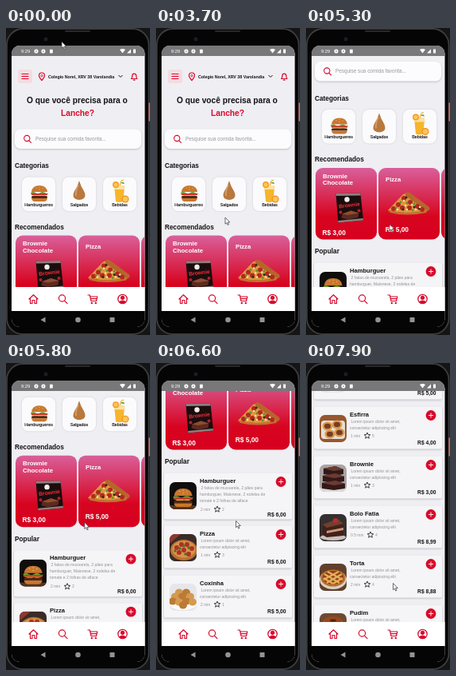
Recreate the animation shown at these times as an HTML page. Size 181x384 px, loop 8000 ms.

```html
<!DOCTYPE html>
<html lang="pt-BR">
<head>
<meta charset="utf-8">
<title>Lanches</title>
<style>
html, body { margin: 0; width: 100%; height: 100%; overflow: hidden; background: #111; }
svg { display: block; width: 100vw; height: 100vh; font-family: "Liberation Sans", Arial, sans-serif; }
.b { font-weight: 700; }
.m { stroke: currentColor; stroke-width: .12; }
.line { fill: none; stroke: #d80a2c; stroke-width: 1.2; stroke-linecap: round; stroke-linejoin: round; }
.card { filter: drop-shadow(0 1px 1.2px #0003); }
.soft { filter: drop-shadow(0 .5px 1.2px #0002); }
</style>
</head>
<body>
<svg id="stage" viewBox="0 0 181 384"></svg>
<script>
const RED = '#d80a2c', INK = '#131216', GREY = '#939197', NAV = '#939396';

const rect = (x, y, w, h, fill, r = 0, extra = '') =>
  `<rect x="${x}" y="${y}" width="${w}" height="${h}" rx="${r}" fill="${fill}" ${extra}/>`;
const oval = (x, y, rx, ry, fill, extra = '') =>
  `<ellipse cx="${x}" cy="${y}" rx="${rx}" ry="${ry}" fill="${fill}" ${extra}/>`;
const dot = (x, y, r, fill, extra) => oval(x, y, r, r, fill, extra);
const path = (d, fill, extra = '') => `<path d="${d}" fill="${fill}" ${extra}/>`;
const line = d => `<path class="line" d="${d}"/>`;
const text = (x, y, size, str, fill = INK, extra = '') =>
  `<text x="${x}" y="${y}" font-size="${size}" fill="${fill}" ${extra}>${str}</text>`;
const bold = (x, y, size, str, fill, extra = '') => text(x, y, size, str, fill, `class="b" ${extra}`);
const move = (x, y, body, s = 1) => `<g transform="translate(${x} ${y}) scale(${s})">${body}</g>`;
const dots = (list, r, fill) => list.map(([x, y]) => dot(x, y, r, fill)).join('');
const MID = 'text-anchor="middle"';

// Food drawings
const burger =
  path('M1 8Q2 0 11 0T21 8Z', '#c9772e') + dots([[7, 3], [11, 2], [15, 3.5], [11, 5]], .5, '#f3d9a0') +
  path('M0 9Q3 7 6 9T12 9T18 9T22 9L21 12H1Z', '#6f9a32') +
  rect(1, 10, 20, 2, '#c93423', 1) + path('M2 12H20L15 14L12 12.5L7 14.5Z', '#f2b530') +
  rect(1, 13, 20, 3, '#4f281a', 1.5) + path('M1 16H21Q20 20 17 20H5Q2 20 1 16Z', '#c9772e');

const drop = color => path('M0 -12Q2 -5 6 1Q9 7 6 10Q0 14 -6 10Q-9 7 -6 1Q-2 -5 0 -12Z', color) +
  path('M-1 -7Q-5 1 -4 7', 'none', 'stroke="#fff4" stroke-width="2"');

const juice =
  path('M8 9L11 0L14 -1', 'none', 'stroke="#e7a21c" stroke-width="1"') +
  path('M2 6H15L13.500 26Q8 28 4 26Z', '#f6b52c') + path('M2 6H15L14.600 11H2.400Z', '#fbe2a0') +
  dot(4, 5, 4, '#f39a1b') + dot(4, 5, 2.6, '#fbc75b') +
  dot(16, 23, 4.5, '#f08f1a') + dot(16, 23, 3.3, '#fac65a') + path('M10 3Q14 0 15 4Z', '#5d9b3d');

const slice =
  path('M1 24L20 4L26 2L53 23Q35 31 1 24Z', '#dd983f') +
  path('M23 2Q27 0 30 3L53 20Q55 24 50 25L23 6Z', '#b5662b') +
  path('M1 24Q24 30 51 23L49 27Q24 32 4 27Z', '#c17430') +
  dots([[21, 9], [29, 14], [38, 19], [28, 21], [14, 17], [19, 21], [8, 22], [44, 23]], 3, '#b3281f') +
  dots([[24, 8], [34, 20], [20, 23], [40, 22]], 1.5, '#2c2a1b') +
  dots([[25, 15], [34, 16], [17, 14], [32, 24], [11, 21]], 1.4, '#5f8f36') +
  dots([[23, 18], [31, 17], [41, 20], [13, 23], [21, 12], [25, 23], [36, 23]], 1.2, '#f9e3a4');

const packet =
  path('M1 1.500L32 1L35.500 35L4 38Z', '#1b0d0e') + path('M1 1.500L32 1L32.300 4L1.300 4.500Z', '#8c7f7f') +
  path('M3.700 35.500L35.300 32.500L35.500 35L4 38Z', '#8c7f7f') + dot(15, 9, 3.2, '#f1ece8') +
  `<g transform="rotate(-7 5 20)">${bold(5, 20, 6.8, 'Brownie', '#ef2f38')}</g>` +
  path('M9 27L20 23L30 26L29 31.500L16 34L8 32Z', '#5c2a1e') + path('M9 27L20 23L30 26L16 28.500Z', '#8f4c33') +
  dots([[7, 25], [30, 23]], 2, '#b51f2a');

const photos = {
  burger: rect(0, 0, 34, 34, '#100d0d') + rect(0, 29, 34, 5, '#55331f') + move(4.5, 8, burger, 1.15),
  pizza: rect(0, 0, 34, 34, '#3b2b28') + oval(18, 20, 17, 13, '#b8702f') + oval(18, 19, 14.5, 10.5, '#d8934a') +
    dots([[9, 17], [15, 13], [22, 13], [28, 18], [18, 20], [12, 23], [24, 25]], 3, '#ab3324') +
    dots([[13, 18], [24, 17], [20, 25], [7, 21], [18, 15]], 1.7, '#4f6f2f') + path('M0 0H14L0 12Z', '#8a3a30'),
  coxinha: rect(0, 0, 34, 34, '#e6e7ea') + oval(17, 25, 17, 8, '#fbfaf8') +
    [[12, 11], [21, 11], [7, 16], [16, 16], [26, 16], [4, 22], [12, 23], [21, 22], [29, 23], [17, 27]]
      .map(([x, y], i) => oval(x, y, 5, 4.6, i % 2 ? '#bd7a35' : '#d39a50')).join(''),
  esfirra: rect(0, 0, 34, 34, '#96572f') + rect(2, 7, 30, 23, '#e8dfd5', 4) +
    [[10, 14], [22, 12], [13, 24], [25, 22]].map(([x, y]) =>
      oval(x, y, 6.5, 5.5, '#d99b4c') + oval(x, y, 4, 3.2, '#7a3c22')).join(''),
  brownie: rect(0, 0, 34, 34, '#a9a4a3') + oval(17, 31, 17, 4, '#dcd8d5') +
    [5, 14, 23].map((y, i) => path(`M${5 - i} ${y}L20 ${y - 3}L${30 + i} ${y + 1}V${y + 7}L18 ${y + 9}L${5 - i} ${y + 7}Z`, '#32191a') +
      path(`M${5 - i} ${y}L20 ${y - 3}L${30 + i} ${y + 1}L18 ${y + 3}Z`, '#6b3c31')).join(''),
  cake: rect(0, 0, 34, 34, '#35302f') + oval(17, 29, 16, 4, '#c9c2bd') +
    path('M4 13L23 6L30 12V27L9 29L4 26Z', '#43201b') + path('M4 13L23 6L30 12L9 17Z', '#70402f') +
    path('M9 21L30 17V20L9 24Z', '#c69a79') + dot(20, 8, 3, '#b92b30'),
  pie: rect(0, 0, 34, 34, '#60402d') + oval(17, 20, 17, 12, '#d9d0c4') + oval(17, 18, 15.5, 10.5, '#b96d28') +
    oval(17, 17.5, 13, 8.5, '#8c4219') +
    path('M6 13L25 24M10 10L29 20M5 18L17 25M28 13L9 24M24 10L5 20M29 18L17 25', 'none', 'stroke="#e6af5a" stroke-width="2.2"'),
  flan: rect(0, 0, 34, 34, '#6d4932') + oval(17, 26, 16, 6, '#eee7dd') +
    path('M6 8H28L31 25Q17 31 3 25Z', '#dd9a42') + oval(17, 9, 11.5, 5, '#9a481a') + oval(17, 9, 4, 1.7, '#56270f')
};

const star = (x, y) => {
  const pts = Array.from({ length: 10 }, (_, i) => {
    const r = i % 2 ? 1.8 : 4, a = i * Math.PI / 5;
    return `${(x + r * Math.sin(a)).toFixed(2)} ${(y - r * Math.cos(a)).toFixed(2)}`;
  });
  return path(`M${pts.join('L')}Z`, 'none', `stroke="${INK}" stroke-width=".8" stroke-linejoin="round"`);
};

const lorem = ['&#160;Lorem ipsum dolor sit amet,', 'consectetur adipiscing elit'];
const items = [
  ['Hamburguer', 'burger', '2', 2, '6,00', ['&#160;2 fatias de mussarela, 2 pães para',
    'hamburguer, Maionese, 2 rodelas de', 'tomate e 2 folhas de alface']],
  ['Pizza', 'pizza', '1', 3, '6,00'],
  ['Coxinha', 'coxinha', '2', 1, '5,00'],
  ['Esfirra', 'esfirra', '1', 5, '4,00'],
  ['Brownie', 'brownie', '1', 3, '3,00'],
  ['Bolo Fatia', 'cake', '0.5', 4, '8,99'],
  ['Torta', 'pie', '2', 4, '8,88'],
  ['Pudim', 'flan', '1', 4, '5,00']
];

// y = 0 is the middle of the item's name
function item([name, photo, mins, stars, price, lines = lorem], i) {
  const y = i ? 391.5 + 62 * i : 387.5, tall = lines.length > 2;
  const meta = tall ? 36 : 27, shift = mins.length > 1 ? 4 : 0;
  return move(0, y,
    rect(10, -9.5, 161, tall ? 58 : 53, '#f5f4f6', 2, 'class="card"') +
    move(17, tall ? 2 : 1, `<g clip-path="url(#photo)">${photos[photo]}</g>`) +
    bold(55, 2.7, 7.6, name) +
    lines.map((s, n) => text(55, 10.8 + 8 * n, 5.05, s, GREY)).join('') +
    text(56, meta + 1.8, 5, mins + ' min', GREY) + star(77 + shift, meta) +
    text(83 + shift, meta + 1.5, 5, stars, GREY) +
    dot(157, 1.5, 6.4, RED) + path('M154 1.500H160M157 -1.500V4.500', 'none', 'stroke="#fff" stroke-width=".9"') +
    bold(163.5, tall ? 44.7 : 38, 6.7, 'R$ ' + price, INK, 'text-anchor="end"'));
}

const category = (x, label, art) =>
  rect(x - 21, 186.5, 42, 42.5, '#fbfafc', 8, 'class="soft"') + art +
  text(x, 222.5, 5.4, label, INK, `class="m" ${MID}`);

const promo = x => rect(x, 259.5, 77, 89.5, 'url(#promo)', 9);

const page =
  rect(15, 52, 18, 17, '#f5dbe1', 3) + line('M20 57.500H28M20 60.500H28M20 63.500H28') +
  line('M45 65.500Q41.500 61.500 41.500 59.500A3.500 3.500 0 0 1 48.500 59.500Q48.500 61.500 45 65.500Z') +
  dot(45, 59.7, 1.2, 'none', `stroke="${RED}" stroke-width=".8"`) +
  bold(53, 62.5, 5.28, 'Colegio Norel, XRV 38 Varolandia') +
  path('M141.500 59L144 61.500L146.500 59', 'none', `stroke="${INK}" stroke-width="1"`) +
  line('M157.500 63.500Q158.700 62.500 158.700 60A2.500 2.800 0 0 1 163.700 60Q163.700 62.500 164.800 63.500ZM160.300 65.200H162') +
  bold(26, 93.5, 10.2, 'O que você precisa para o') + bold(90, 110, 10.2, 'Lanche?', RED, MID) +
  rect(11, 126.5, 159, 24.5, '#fcfbfd', 7, 'class="card"') +
  dot(26.3, 138, 3.6, 'none', `stroke="${RED}" stroke-width="1.1"`) + line('M29 140.800L31.500 143.300') +
  text(37, 140.7, 6.4, 'Pesquise sua comida favorita...', '#9a98a0') +
  bold(11, 175, 8.3, 'Categorias') +
  category(41, 'Hamburgueres', move(31, 197, burger)) +
  category(92, 'Salgados', move(92, 203, drop('#b9783c'))) +
  category(143, 'Bebidas', move(134, 191, juice)) +
  bold(11, 251.8, 8.3, 'Recomendados') +
  promo(12) + promo(91) + promo(170) +
  bold(21, 272, 7.9, 'Brownie', '#fff') + bold(21, 280.5, 7.9, 'Chocolate', '#fff') +
  bold(100, 276.4, 7.7, 'Pizza', '#fff') +
  move(36.5, 290, packet) + move(102, 288.5, slice) +
  bold(20.5, 343.2, 8.4, 'R$ 3,00', '#fff') + bold(99.7, 339, 8.4, 'R$ 5,00', '#fff') +
  bold(11, 366.5, 8.3, 'Popular') +
  items.map(item).join('');

const statusBar =
  rect(7, 22, 168, 13, '#78777a') + text(19, 31, 5.8, '9:29', '#fff') +
  dot(38, 29, 1.7, 'none', 'stroke="#fff" stroke-width="1.7"') +
  dot(47, 29, 1.7, 'none', 'stroke="#fff" stroke-width="1.7"') + rect(55, 26.8, 3.8, 4.7, '#fff', .6) +
  path('M143 27Q146.500 24.800 150 27L146.500 31.500Z', '#fff') + path('M152 31.500H157V26.500Z', '#fff') +
  rect(160, 26.5, 3, 5, '#fff', .5);

const tabBar =
  rect(7, 324, 168, 30, '#fff') +
  line('M29 339L34.500 333.800L40 339M30.500 338V344.500H33V340.500H36V344.500H38.500V338') +
  dot(70.5, 338, 4.1, 'none', `stroke="${RED}" stroke-width="1.2"`) + line('M73.500 341.200L77 344.700') +
  line('M103 334H105.300L107 341.500H113.500L114.800 336H105.800M106.500 338.700H114') +
  dot(107.8, 344, 1.2, RED) + dot(112.8, 344, 1.2, RED) +
  dot(146.5, 339, 5.7, 'none', `stroke="${RED}" stroke-width="1.3"`) + dot(146.5, 337.3, 2.6, RED) +
  path('M142 342.500Q146.500 338.300 151 342.500Q146.500 347 142 342.500Z', RED);

const navBar =
  rect(7, 354, 168, 20, '#050506') + path('M49.500 361.500V368.500L43.500 365Z', NAV) +
  dot(90.5, 365, 3.3, NAV) + rect(130.5, 362, 6, 6, NAV, .6);

document.getElementById('stage').innerHTML = `
  <defs>
    <linearGradient id="promo" x2="0" y2="1">
      <stop stop-color="#d9609b"/><stop offset=".68" stop-color="#d7041f"/><stop offset="1" stop-color="#d7001f"/>
    </linearGradient>
    <clipPath id="photo"><rect width="34" height="34" rx="7"/></clipPath>
    <clipPath id="screen"><rect x="7" y="22" width="167.500" height="352" rx="10"/></clipPath>
    <clipPath id="view"><rect x="7" y="35" width="167.500" height="289"/></clipPath>
  </defs>
  ${rect(0, 0, 181, 384, '#151516')}
  ${rect(1, 1, 178.5, 382, '#050506', 20, 'stroke="#3d3d40" stroke-width="1.800"')}
  ${rect(179.3, 93.5, 2, 23, '#d0695a')}
  ${rect(74, 3, 32, 2, '#29292c', 1)}${dot(50, 14, 2.5, '#1b1d25')}
  <g clip-path="url(#screen)">
    ${rect(7, 22, 168, 352, '#efeef2')}
    <g clip-path="url(#view)"><g id="page">${page}</g></g>
    ${statusBar}${tabBar}${navBar}
  </g>
  <g id="cursor">${path('M0 0V8.200L1.900 6.500L3.200 9.500L4.500 8.900L3.200 6H5.800Z', '#fff', 'stroke="#333" stroke-width=".7"')}</g>`;

// Keys: time, value...
const scrollKeys = [[0, 0], [4000, 0], [5300, 84.5], [6100, 179.5], [6600, 240.5], [7900, 513.5]];
const cursorKeys = [
  [0, 70, 17], [400, 70, 17], [700, 74, 18], [1000, 74, 18], [1200, 78, 19], [1400, 78, 19], [1500, 91.5, 244.5],
  [1900, 91.5, 244.5], [2000, 107, 290], [2100, 91, 246], [2300, 91, 247], [2900, 91, 247], [3300, 87, 246],
  [3600, 87, 246], [3700, 87, 237], [3800, 78, 223], [3900, 87, 246], [5300, 105, 245.5],
  [6100, 95, 171.5], [6600, 100.5, 197.5], [7900, 109.5, 275.5]
];

function sample(keys, t) {
  const i = keys.findIndex(k => k[0] > t);
  if (i < 0) return keys[keys.length - 1].slice(1);
  const [t0, ...a] = keys[i - 1], [t1, ...b] = keys[i];
  return a.map((v, n) => v + (b[n] - v) * (t - t0) / (t1 - t0));
}

const pageEl = document.getElementById('page'), cursorEl = document.getElementById('cursor');
const start = performance.now();

function draw() {
  const t = Math.floor((performance.now() - start) % 8000 / 100) * 100;
  pageEl.setAttribute('transform', `translate(0 ${-sample(scrollKeys, t)[0]})`);
  cursorEl.setAttribute('transform', `translate(${sample(cursorKeys, t).join(' ')})`);
  requestAnimationFrame(draw);
}
draw();
</script>
</body>
</html>
```
